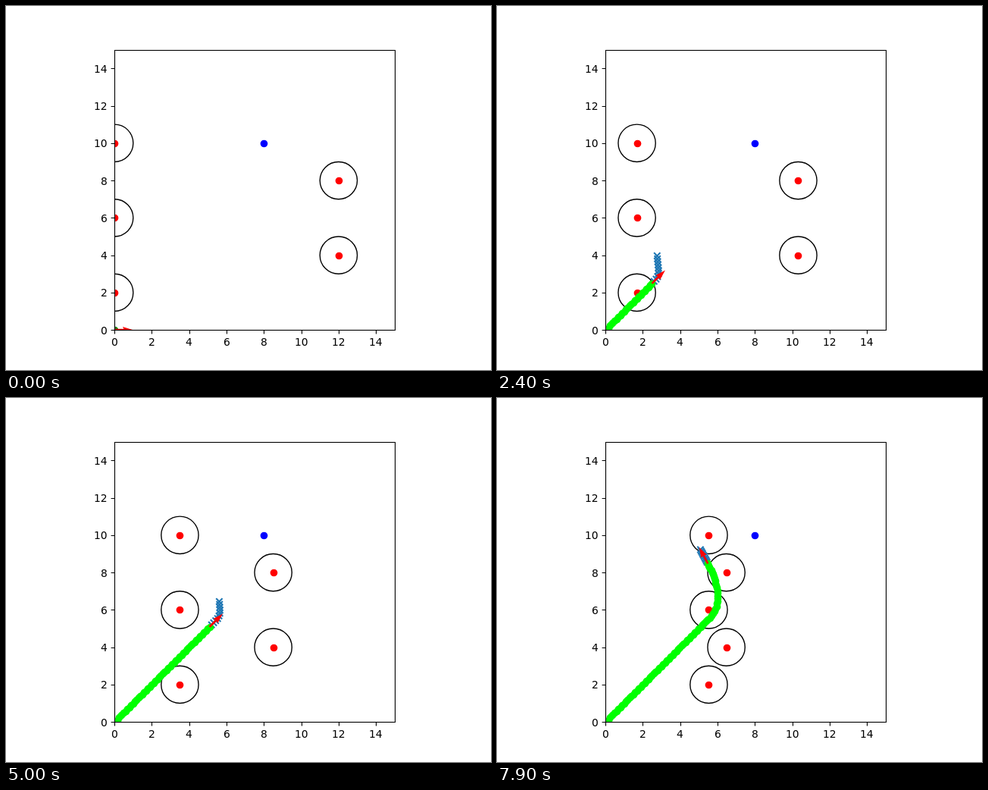
These frames come from a looping animation (640x480 px, 8000 ms). An HTML page with a canvas:

```html
<!DOCTYPE html>
<html lang="en">
<head>
<meta charset="utf-8">
<title>Moving obstacles</title>
<style>
  html, body { margin: 0; width: 100%; height: 100%; overflow: hidden; background: #fff; }
  canvas { display: block; }
</style>
</head>
<body>
<canvas id="stage" width="640" height="480"></canvas>
<script>
const ctx = document.getElementById('stage').getContext('2d');
const STEP = 100, STEPS = 80, UNIT = 24.64;
const LEFT = 143.2, TOP = 57.6, SIDE = 369.6, BOTTOM = TOP + SIDE;
const DOT = 4.86;
const px = x => LEFT + x * UNIT;
const py = y => BOTTOM - y * UNIT;
const snap = v => Math.round(v) + .5;
const rad = deg => deg * Math.PI / 180;
const clamp = v => Math.min(1, Math.max(0, v));

// Linear interpolation in rows of [key, value, ...]
function lerpKeys(rows, k, col = 1) {
  const i = rows.findIndex(r => r[0] >= k);
  if (i < 0) return rows[rows.length - 1][col];
  if (i === 0) return rows[0][col];
  const a = rows[i - 1], b = rows[i];
  return a[col] + (b[col] - a[col]) * (k - a[0]) / (b[0] - a[0]);
}

const headingKeys = [[0, 0], [1, 60], [3, 45], [55, 45], [58, 63], [62, 84],
                     [67, 102], [72, 110], [79, 118]];
const speedKeys = [[0, .175], [3, .175], [4, .1414], [66, .1414], [79, .09]];
// Planned path: step, total turn, where the turn happens, length
const planKeys = [[1, 0, .5, 1.4], [16, 0, .5, 1.36], [24, 51, .33, 1.6], [40, 45, .55, 1.5],
                  [50, 50, .52, 1.56], [62, 50, .5, 1.32], [79, 0, .5, .85]];

const heading = k => lerpKeys(headingKeys, k);
const advance = ([x, y], deg, d) => [x + d * Math.cos(rad(deg)), y + d * Math.sin(rad(deg))];

const track = [[0, 0]];
for (let k = 0; k < STEPS - 1; k++)
  track.push(advance(track[k], (heading(k) + heading(k + 1)) / 2, lerpKeys(speedKeys, k)));

function plan(k) {
  const [turn, mid, length] = [1, 2, 3].map(c => lerpKeys(planKeys, k, c));
  const points = [];
  let p = track[k];
  for (let i = 0; i < 10; i++) {
    const bend = clamp(((i + .5) / 10 - mid) / .4 + .5);
    points.push(p = advance(p, heading(k) + turn * bend, length / 10));
  }
  return points;
}

// Dots sit on whole pixels
function dot(x, y, color) {
  ctx.fillStyle = color;
  ctx.beginPath();
  ctx.arc(snap(px(x)), snap(py(y)), DOT, 0, 7);
  ctx.fill();
}

function ring(x, y) {
  ctx.strokeStyle = '#000';
  ctx.lineWidth = 1.39;
  ctx.beginPath();
  ctx.arc(px(x), py(y), UNIT, 0, 7);
  ctx.stroke();
}

function cross([x, y]) {
  const r = 4.17, cx = px(x), cy = py(y);
  ctx.strokeStyle = '#1f77b4';
  ctx.lineWidth = 2.08;
  ctx.beginPath();
  ctx.moveTo(cx - r, cy - r);
  ctx.lineTo(cx + r, cy + r);
  ctx.moveTo(cx - r, cy + r);
  ctx.lineTo(cx + r, cy - r);
  ctx.stroke();
}

function arrow([x, y], deg) {
  const w = 2.77, neck = UNIT - 4.5 * w, barb = UNIT - 5 * w;
  ctx.save();
  ctx.translate(px(x), py(y));
  ctx.rotate(-rad(deg));
  ctx.fillStyle = '#f00';
  ctx.beginPath();
  [[0, -w / 2], [neck, -w / 2], [barb, -1.5 * w], [UNIT, 0],
   [barb, 1.5 * w], [neck, w / 2], [0, w / 2]].forEach(p => ctx.lineTo(...p));
  ctx.fill();
  ctx.restore();
}

function axes() {
  const left = snap(LEFT), right = snap(LEFT + SIDE), top = snap(TOP), bottom = snap(BOTTOM);
  ctx.strokeStyle = ctx.fillStyle = '#000';
  ctx.lineWidth = 1.11;
  ctx.font = '13.89px "DejaVu Sans", sans-serif';
  ctx.strokeRect(left, top, right - left, bottom - top);
  ctx.beginPath();
  for (let v = 0; v < 15; v += 2) {
    const x = snap(px(v)), y = snap(py(v)), width = ctx.measureText(v).width;
    ctx.moveTo(x, bottom);
    ctx.lineTo(x, bottom + 4.9);
    ctx.moveTo(left, y);
    ctx.lineTo(left - 4.9, y);
    ctx.fillText(v, Math.round(px(v) - width / 2), 448);
    ctx.fillText(v, Math.round(133.5 - width), Math.round(py(v) + 5.5));
  }
  ctx.stroke();
}

function draw(k) {
  ctx.fillStyle = '#fff';
  ctx.fillRect(0, 0, 640, 480);
  ctx.save();
  ctx.beginPath();
  ctx.rect(LEFT, TOP, SIDE, SIDE);
  ctx.clip();
  const shift = .07 * k;
  const obstacles = [[shift, 2], [shift, 6], [shift, 10], [12 - shift, 4], [12 - shift, 8]];
  obstacles.forEach(o => ring(...o));
  obstacles.forEach(o => dot(...o, '#f00'));
  dot(8, 10, '#00f');
  if (k) {
    plan(k).forEach(cross);
    for (let i = 1; i <= k; i++) dot(...track[i], '#0f0');
  } else {
    dot(0, 0, '#008000');
  }
  arrow(track[k], heading(k));
  ctx.restore();
  axes();
}

const start = performance.now();
function tick() {
  const t = Math.max(0, performance.now() - start);
  draw(Math.floor(t / STEP) % STEPS);
  requestAnimationFrame(tick);
}
tick();
</script>
</body>
</html>
```
